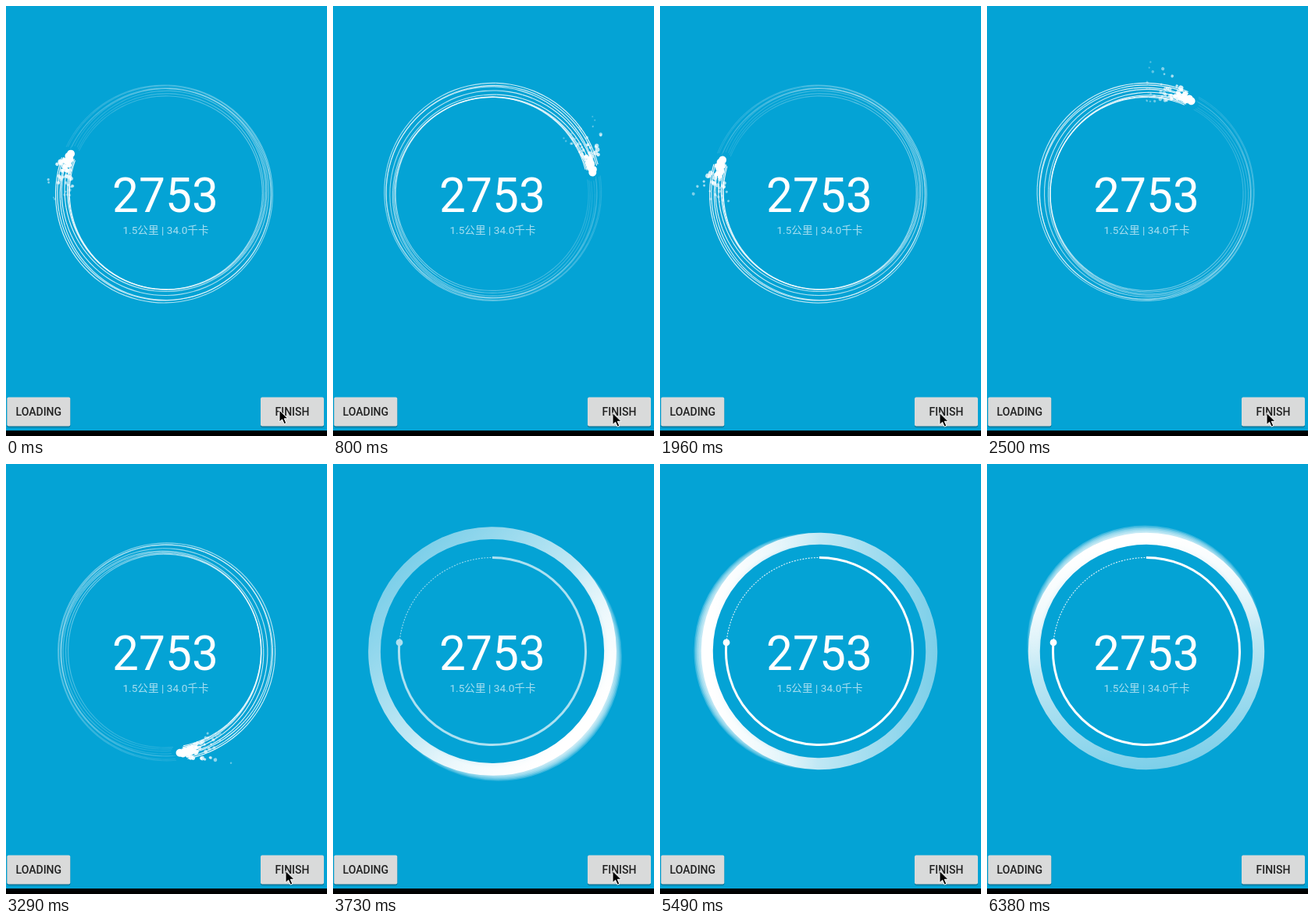
An HTML page for the animation above (6.48 s loop, 411 px wide and 549 px high).

```html
<!DOCTYPE html>
<html lang="zh">
<head>
<meta charset="utf-8">
<style>
  html, body { margin: 0; width: 100%; height: 100%; overflow: hidden; background: #04a3d5; }
  svg { display: block; width: 100%; height: 100%; }
  text { text-anchor: middle; font-family: Roboto, "Noto Sans CJK SC", "Noto Sans CJK", sans-serif; }
  .count { font-size: 60.4px; fill: #fff; }
  .detail { font-size: 13.65px; fill: #fff; fill-opacity: .65; }
  .label { font-size: 14px; font-weight: 500; fill: #212121; }
</style>
</head>
<body>
<svg viewBox="0 0 411 549">
  <defs>
    <linearGradient id="sheen" gradientUnits="userSpaceOnUse" x1="-151" y1="0" x2="140" y2="0">
      <stop offset="0" stop-color="#fff" stop-opacity=".48"/>
      <stop offset=".5" stop-color="#fff" stop-opacity=".74"/>
      <stop offset="1" stop-color="#fff"/>
    </linearGradient>
    <linearGradient id="haze" gradientUnits="userSpaceOnUse" x1="0" y1="0" x2="150" y2="0">
      <stop offset="0" stop-color="#fff" stop-opacity="0"/>
      <stop offset="1" stop-color="#fff" stop-opacity=".22"/>
    </linearGradient>
  </defs>
  <rect width="411" height="549" fill="#04a3d5"/>

  <g transform="translate(204 239)" fill="none">
    <g id="comet"></g>
    <g id="ring">
      <g id="glow"></g>
      <circle r="143.7" stroke="url(#sheen)" stroke-width="15"/>
    </g>
    <g id="dial" stroke="#fff">
      <path id="done" stroke-width="3"/>
      <path id="rest" stroke-width="1.1" stroke-dasharray="2 1.6" stroke-opacity=".85"/>
      <circle id="knob" r="4.4" fill="#fff" stroke="none"/>
    </g>
  </g>

  <text class="count" x="204" y="263">2753</text>
  <text class="detail" x="204.5" y="291">1.5公里 | 34.0千卡</text>

  <rect y="542" width="411" height="7" fill="#000"/>
  <g id="buttons"></g>
  <path id="cursor" d="M0 0V15L3.6 11.8L6.2 17.6L8.8 16.5L6.3 10.8H11Z" fill="#000" stroke="#fff" stroke-width="1"/>
</svg>
<script>
const LOOP = 6480, STEPS = 73, STEP = 88.6;
const $ = id => document.getElementById(id);
const clamp = x => Math.max(0, Math.min(1, x));
const ease = x => x * x * (3 - 2 * x);

function add(parent, tag, attrs, text) {
  const el = document.createElementNS("http://www.w3.org/2000/svg", tag);
  for (const k in attrs) el.setAttribute(k, attrs[k]);
  if (text) el.textContent = text;
  parent.appendChild(el);
  return el;
}

let seed = 29;
function rand() {
  seed = (seed * 16807) % 2147483647;
  return seed / 2147483647;
}

function polar(r, deg, cx = 0, cy = 0) {
  const a = deg * Math.PI / 180;
  return [cx + r * Math.cos(a), cy + r * Math.sin(a)];
}

function arc(r, from, to, cx = 0, cy = 0) {
  const fmt = p => p.map(v => v.toFixed(2)).join(" ");
  const large = Math.abs(to - from) > 180 ? 1 : 0;
  const sweep = to > from ? 1 : 0;
  return `M${fmt(polar(r, from, cx, cy))}A${r} ${r} 0 ${large} ${sweep} ${fmt(polar(r, to, cx, cy))}`;
}

// Piecewise eased value through [time, value] points.
function track(points, t) {
  let [t0, v0] = points[0];
  for (const [t1, v1] of points) {
    if (t < t1) return t1 > t0 && t > t0 ? v0 + (v1 - v0) * ease((t - t0) / (t1 - t0)) : v0;
    [t0, v0] = [t1, v1];
  }
  return v0;
}

// Fading strands as [radius, offset, offset direction]; the head lies at
// angle 0, the tail runs backwards, and the inner strands meet at -90.
const comet = $("comet");
const strands = [
  [123.5, 1, 120], [125, 2.4, 95], [127, 4, 90], [129.5, 4, 75],
  [132.5, 2, 60], [135, 1.5, -120], [137, 1.2, -20], [139, 1.8, -55]
];
for (const [r, offset, dir] of strands) {
  const [cx, cy] = polar(offset, dir);
  const parts = 48, span = 354 / parts;
  for (let j = 0; j < parts; j++) {
    const from = -3 - j * span;
    add(comet, "path", {
      d: arc(r, from, from - span, cx, cy),
      stroke: "#fff", "stroke-width": 1.15,
      "stroke-opacity": (.92 - .82 * j / parts).toFixed(3)
    });
  }
}

for (let i = 0; i < 7; i++) {
  const [cx, cy] = polar(131 + (i % 2 ? 1.8 : -1.8) * (i > 0), -i * 1.6);
  add(comet, "circle", { cx, cy, r: 5 - i * .4, fill: "#fff" });
}

const sparks = Array.from({ length: 46 }, (_, i) => ({
  el: add(comet, "circle", { fill: "#fff" }),
  phase: rand(),
  life: 420 + rand() * 260,
  drift: i % 5 === 0 ? 26 + rand() * 14 : -18 + rand() * 38,
  size: 2.2 + rand() * 1.6
}));

for (let i = 1; i <= 6; i++)
  add($("glow"), "circle", { cx: i * 1.55, r: 143.7, stroke: "url(#haze)", "stroke-width": 15 });

const END = 185.3, R = 119.5;
$("done").setAttribute("d", arc(R, -90, END));
$("rest").setAttribute("d", arc(R, END, 270));
const [kx, ky] = polar(R, END);
$("knob").setAttribute("cx", kx);
$("knob").setAttribute("cy", ky);

function button(x, label) {
  const g = $("buttons");
  add(g, "rect", { x, y: 500.5, width: 81, height: 38, rx: 2.5, fill: "#000", "fill-opacity": .14 });
  add(g, "rect", { x, y: 500, width: 81, height: 37.5, rx: 2, fill: "#000", "fill-opacity": .22 });
  const face = add(g, "rect", { x, y: 499.5, width: 81, height: 37, rx: 2, fill: "#d9dada" });
  add(g, "text", { x: x + 40.5, y: 523, class: "label" }, label);
  return face;
}
button(1.3, "LOADING");
const finish = button(326, "FINISH");

function draw(t) {
  const loading = 1 - clamp((t - 3360) / 200);
  comet.setAttribute("opacity", loading);
  comet.setAttribute("transform", `rotate(${202.6 + .1828 * t})`);
  for (const s of sparks) {
    const p = (s.phase + t / s.life) % 1;
    const [x, y] = polar(131 + s.drift * p ** .8, -2 - 24 * p);
    s.el.setAttribute("cx", x.toFixed(2));
    s.el.setAttribute("cy", y.toFixed(2));
    s.el.setAttribute("r", (s.size * (1 - .6 * p)).toFixed(2));
    s.el.setAttribute("fill-opacity", (1 - .72 * p).toFixed(3));
  }

  const scale = track([[3370, .92], [3550, 1.175], [3860, .96], [4230, 1]], t);
  const turn = 110 + .081 * (t - 4530);
  $("ring").setAttribute("opacity", clamp((t - 3370) / 180));
  $("ring").setAttribute("transform", `rotate(${turn}) scale(${scale})`);
  $("dial").setAttribute("opacity", clamp((t - 3450) / 400));

  finish.setAttribute("fill", t > 3340 && t < 3500 ? "#bcbdbd" : "#d9dada");
  const x = track([[90, 350], [350, 358], [5480, 358], [5680, 367]], t);
  const y = track([[90, 516], [350, 519.5], [5480, 519.5], [5680, 536]], t);
  $("cursor").setAttribute("transform", `translate(${x} ${y})`);
  $("cursor").setAttribute("visibility", t < 5720 ? "visible" : "hidden");
}

let start;
function tick(now) {
  if (start === undefined) start = now;
  const t = (now - start) % LOOP;
  const step = Math.min(STEPS - 1, Math.floor(t * STEPS / LOOP + .15));
  draw(step * STEP);
  requestAnimationFrame(tick);
}
draw(0);
requestAnimationFrame(tick);
</script>
</body>
</html>
```
